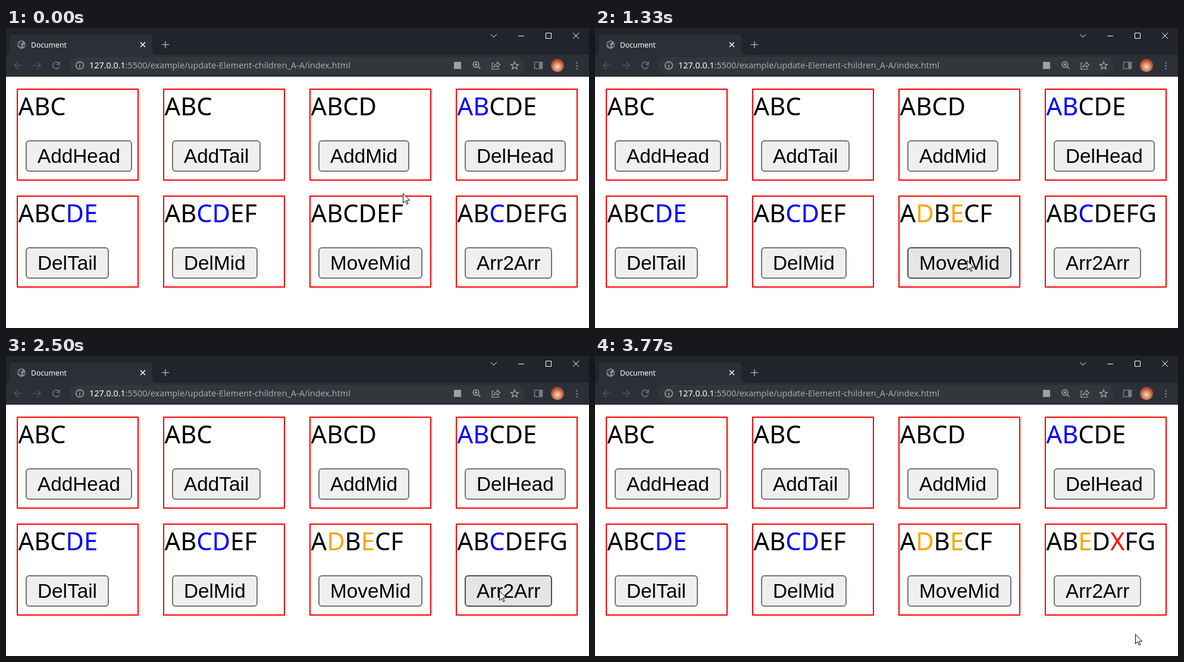
These frames come from a looping animation (980 by 505 pixels, 3800 ms). An HTML page:

```html
<!DOCTYPE html>
<html lang="en">
<head>
<meta charset="utf-8">
<title>Document</title>
<style>
  html, body { margin: 0; width: 100%; height: 100%; overflow: hidden; background: #fff; }
  svg { display: block; }
  text { font-family: "Noto Sans", sans-serif; white-space: pre; }
  .letters { font-size: 41.7px; font-kerning: none; }
  .label { font: 33.333px "Liberation Sans", Arial, sans-serif; }
  .line { fill: none; stroke-width: 1.5; }
</style>
</head>
<body>
<svg width="980" height="505" viewBox="0 0 980 505">
  <defs>
    <radialGradient id="avatar" cx=".5" cy=".6">
      <stop offset="0" stop-color="#f3dcc0"/>
      <stop offset=".5" stop-color="#d99a72"/>
      <stop offset="1" stop-color="#b5432f"/>
    </radialGradient>
  </defs>

  <!-- Tab strip -->
  <rect width="980" height="45" fill="#21252b"/>
  <rect y="45" width="980" height="37" fill="#2b2f37"/>
  <path d="M0 45Q6 45 6 38V19Q6 11 14 11H238Q246 11 246 19V38Q246 45 253 45Z" fill="#2b2f37"/>
  <circle cx="26" cy="28" r="7" fill="#898c91"/>
  <path d="M21 25L26 22L29 24L25 27L27 30L24 33L20 28ZM29 28L32 27L31 31L28 32Z" fill="#3c4047"/>
  <text x="42" y="33" font-size="12.2" fill="#fff">Document</text>
  <g class="line" stroke="#fff">
    <path d="M226 24L234 32M234 24L226 32"/>
    <path d="M262 28H274M268 22V34" stroke="#a0a3a8"/>
    <path d="M815 10.5L820 15.5L825 10.5M861 13.5H871M907.5 8.5H916.5V17.5H907.5ZM953 8L963 18M963 8L953 18" stroke-width="1"/>
  </g>

  <!-- Toolbar -->
  <rect x="106" y="49" width="767" height="28" rx="14" fill="#33363b"/>
  <g class="line" stroke="#a5a8ad">
    <path d="M27 63H14M20 57L14 63L20 69M45 63H58M52 57L58 63L52 69" stroke="#50555c"/>
    <path d="M89 60A5.6 5.6 0 1 0 89.5 65M90 57V61.5H85.5" stroke="#777c83"/>
    <circle cx="124" cy="63" r="6.3"/>
    <path d="M124 62V67M124 59V60.5"/>
    <circle cx="790" cy="61.5" r="4.8"/>
    <path d="M793.5 65L797.5 69M787.5 61.5H792.5M790 59V64"/>
    <path d="M820 59H817V69.5H828V67M820 66Q820.5 60.5 826 60.5V57.5L830.5 62L826 66V63.5Q822.5 63.5 820 66Z" stroke-width="1.2"/>
    <path d="M855 57L856.8 61.2L861.3 61.6L857.9 64.5L858.9 69L855 66.6L851.1 69L852.1 64.5L848.7 61.6L853.2 61.2Z" stroke-width="1.3"/>
    <path d="M888.5 57.5H901.5V68.5H888.5Z" stroke="#777b81"/>
  </g>
  <rect x="896" y="57" width="6" height="12" fill="#777b81"/>
  <rect x="753" y="57" width="12" height="12" fill="#9da0a5"/>
  <text x="140" y="68" font-size="14.35" fill="#a5a8ad"><tspan fill="#fff">127.0.0.1</tspan>:5500/example/update-Element-children_A-A/index.html</text>
  <circle cx="927" cy="63" r="11" fill="url(#avatar)"/>
  <g fill="#777b81">
    <circle cx="959.5" cy="58.5" r="1.5"/>
    <circle cx="959.5" cy="63.5" r="1.5"/>
    <circle cx="959.5" cy="68.5" r="1.5"/>
  </g>

  <g id="cards"></g>
  <path id="cursor" d="M.5 .5V16.5L4.2 13L6.8 18.7L9 17.8L6.5 12.1H11.6Z" fill="#fff" stroke="#000"/>
</svg>
<script>
const LOOP = 3800;

// Each card: plain letters with runs of "color:letters", button label, button width.
const cards = [
  ["ABC", "AddHead", 179], ["ABC", "AddTail", 149],
  ["ABCD", "AddMid", 153], ["blue:AB CDE", "DelHead", 170],
  ["ABC blue:DE", "DelTail", 140], ["AB blue:CD EF", "DelMid", 144],
  ["ABCDEF", "MoveMid", 175], ["AB blue:C DEFG", "Arr2Arr", 147]
];

const buttonStyles = {
  idle: ["#efefef", "#767676"],
  hover: ["#e5e5e5", "#4f4f4f"],
  active: ["#f5f5f5", "#8d8d8d"]
};

// Cursor moves in discrete steps; the first one is taken at the start time.
const moves = [
  { start: 480, end: 850, steps: 13, to: [625, 391], ease: u => u * u * (3 - 2 * u) },
  { start: 1700, end: 1940, steps: 9, to: [703, 398], ease: u => u ** 1.2 },
  { start: 1970, end: 2210, steps: 9, to: [783, 398], ease: u => u },
  { start: 2240, end: 2500, steps: 9, to: [829, 395], ease: u => 1 - (1 - u) ** 1.5 },
  { start: 3570, end: 3770, steps: 7, to: [908, 468], ease: u => u ** 1.3 }
];

const moveMid = { hover: [770, 1970], press: [1230, 1330], result: "A orange:D B orange:E CF" };
const arr2Arr = { hover: [2200, 3700], press: [2890, 3040], result: "AB orange:E D red:X FG" };

const letters = runs => runs.split(" ").map(run => {
  const [text, color = "black"] = run.split(":").reverse();
  return `<tspan fill="${color}">${text}</tspan>`;
}).join("");

document.getElementById("cards").innerHTML = cards.map(([runs, label, width], i) => `
  <g transform="translate(${18 + i % 4 * 246} ${102 + (i >> 2) * 180})">
    <rect x="1" y="1" width="203" height="153" fill="#fff" stroke="#f00" stroke-width="2"/>
    <text class="letters" x="2.5" y="45">${letters(runs)}</text>
    <rect class="button" x="16" y="88" width="${width - 2}" height="51" rx="5"
      fill="#efefef" stroke="#767676" stroke-width="2"/>
    <text class="label" x="35" y="125">${label}</text>
  </g>`).join("");

const texts = document.querySelectorAll(".letters");
const buttons = document.querySelectorAll(".button");
const cursor = document.getElementById("cursor");

function cursorAt(t) {
  let pos = [667, 278];
  for (const { start, end, steps, to, ease } of moves) {
    if (t < start) break;
    const step = Math.min(steps, Math.floor((t - start) / (end - start) * (steps - 1) + 1e-6) + 1);
    const u = ease(step / steps);
    pos = pos.map((from, axis) => Math.round(from + (to[axis] - from) * u));
  }
  return pos;
}

function drawCard(index, { hover, press, result }, t) {
  const within = ([from, to]) => t >= from && t < to;
  const state = within(press) ? "active" : within(hover) ? "hover" : "idle";
  const [fill, stroke] = buttonStyles[state];
  buttons[index].setAttribute("fill", fill);
  buttons[index].setAttribute("stroke", stroke);
  texts[index].innerHTML = letters(t >= press[1] ? result : cards[index][0]);
}

function draw(now) {
  const t = now % LOOP;
  drawCard(6, moveMid, t);
  drawCard(7, arr2Arr, t);
  cursor.setAttribute("transform", `translate(${cursorAt(t)})`);
}

const begin = performance.now();
function frame() {
  draw(performance.now() - begin);
  requestAnimationFrame(frame);
}
frame();
</script>
</body>
</html>
```
